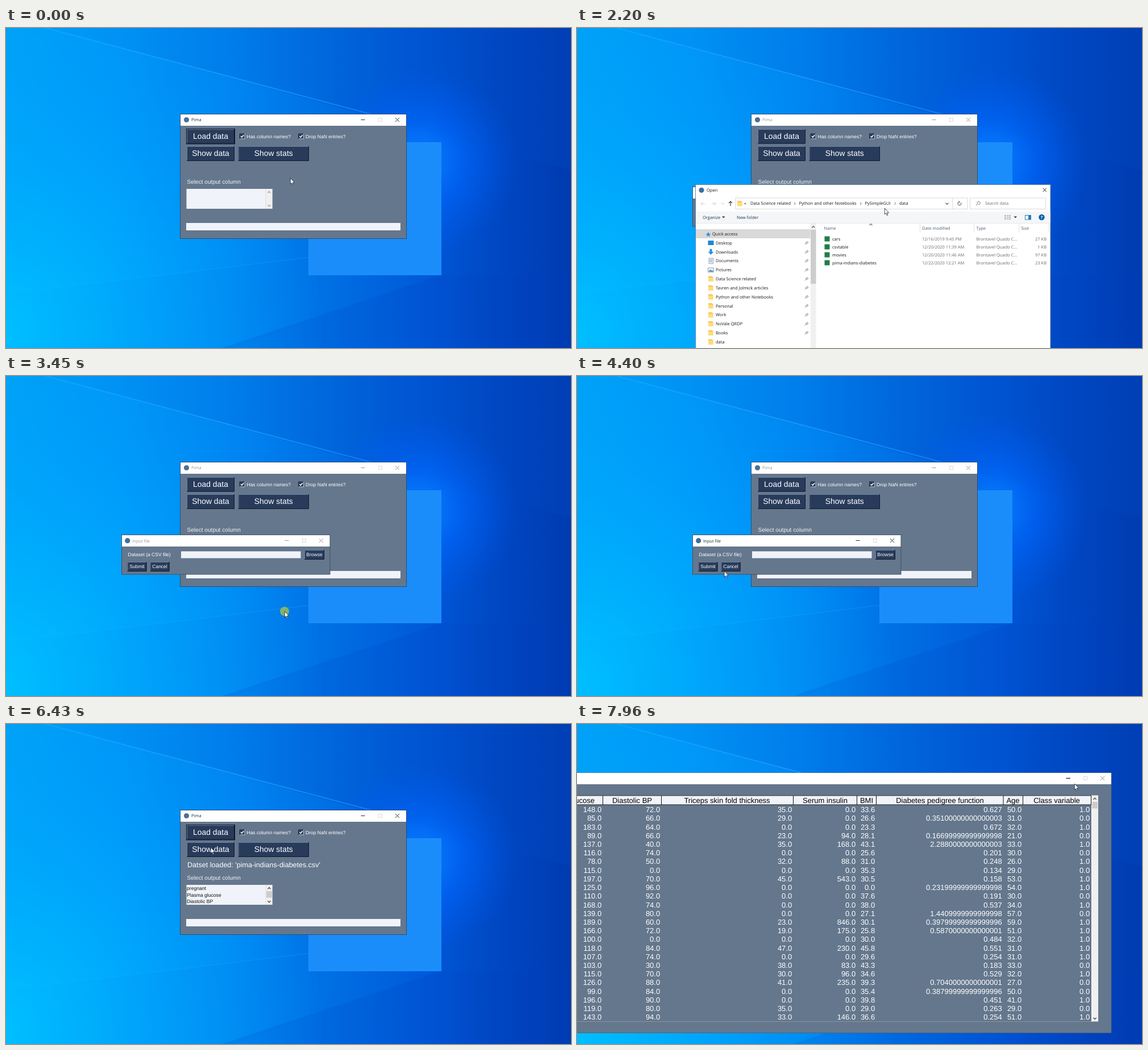
An HTML page for the animation above (8000 ms loop, 994x563 px).

```html
<!DOCTYPE html>
<html lang="en">
<head>
<meta charset="utf-8">
<title>Loading a dataset</title>
<style>
html, body { margin: 0; width: 100%; height: 100%; overflow: hidden; background: #0068dd; }
svg { display: block; width: 994px; height: 563px; }
text { font-family: "Liberation Sans", Arial, sans-serif; font-size: 8.5px; fill: #fff; white-space: pre; text-rendering: geometricPrecision; }
.ui text, text.ui { font-family: "Open Sans", "Noto Sans", sans-serif; font-size: 7.5px; fill: #1a1a1a; }
.ui .head { fill: #4c607a; }
.ui .soft { fill: #6d6d6d; }
.ui .bar { fill: #1e395b; }
.title text { fill: currentColor; }
.big { font-size: 13.9px; }
.list text { font-size: 8.6px; fill: #111; }
.mid { text-anchor: middle; }
.end { text-anchor: end; }
.line { fill: none; stroke: #777; stroke-width: 1; }
.grid text { font-size: 13px; }
.grid .name { fill: #000; }

/* One percent is 80 ms */
.title, .input, .open, .loaded, .away, .halo, .hover, .sheet, .grid, .blank, .min {
  animation: 8s step-end infinite;
}
.main.title { animation-name: main-title; }
.input { animation-name: input; }
.input .title { animation-name: input-title; }
.open { animation-name: open; }
.loaded { animation-name: loaded; }
.away { animation-name: away; }
.halo { animation-name: halo; }
.hover { animation-name: hover; }
.sheet { animation-name: sheet; }
.sheet .grid { animation-name: grid; }
.min { animation-name: min; }
.pointer { animation: pointer 8s infinite linear; }

@keyframes main-title { 0%, 59.75% { color: #12303f } 9.25%  { color: #999 } 100% { color: #12303f } }
@keyframes input-title { 0%, 43.625% { color: #12303f } 24.375% { color: #999 } 100% { color: #12303f } }
@keyframes input { 0%, 59.75%, 100% { visibility: hidden } 9.25% { visibility: visible } }
@keyframes away { 0%, 59.75%, 100% { visibility: visible } 9.25% { visibility: hidden } }
@keyframes open { 0%, 43%, 100% { visibility: hidden } 27.5% { visibility: visible } }
@keyframes loaded { 0% { visibility: hidden } 59.75%, 100% { visibility: visible } }
@keyframes sheet { 0% { visibility: hidden } 88.125%, 100% { visibility: visible } }
@keyframes grid { 0% { visibility: hidden } 89.75%, 100% { visibility: visible } }
@keyframes min { 0% { visibility: hidden } 99.1%, 100% { visibility: visible } }
@keyframes halo {
  0%, 9.75%, 23.5%, 41.9%, 43.625%, 60.5%, 88%, 100% { opacity: 0 }
  8.75%, 22.75%, 41.25%, 42.6%, 59.125%, 87.375% { opacity: 1 }
}
@keyframes hover {
  0% { opacity: 0; transform: none; fill: #e5f3ff }
  31.375% { opacity: 1; transform: none; fill: #e5f3ff }
  32.375% { opacity: 1; transform: translateY(14px); fill: #e5f3ff }
  33.625% { opacity: 1; transform: translateY(28px); fill: #e5f3ff }
  35.75% { opacity: 1; transform: translateY(42px); fill: #e5f3ff }
  41.25%, 100% { opacity: 1; transform: translateY(42px); fill: #cce8ff }
}
@keyframes pointer {
  0%, .4% { transform: translate(500px, 264px); animation-timing-function: ease-in-out }
  4.625% { transform: translate(377px, 188px) }
  13.6% { transform: translate(377px, 188px); animation-timing-function: ease-in }
  17.5% { transform: translate(501px, 306px); animation-timing-function: ease-out }
  20.875% { transform: translate(541px, 317px) }
  28.1% { transform: translate(541px, 317px); animation-timing-function: cubic-bezier(.4, 0, .7, .8) }
  35.125% { transform: translate(494px, 402px); animation-timing-function: ease-out }
  36.75% { transform: translate(490px, 414px) }
  47.4% { transform: translate(490px, 414px); animation-timing-function: ease-in-out }
  56.875% { transform: translate(239px, 337px) }
  66.3% { transform: translate(239px, 337px) }
  66.875% { transform: translate(257px, 331px) }
  73.1% { transform: translate(413px, 222px); animation-timing-function: ease-out }
  76.5% { transform: translate(392px, 217px) }
  77% { transform: translate(392px, 217px) }
  78.2% { transform: translate(378px, 211px); animation-timing-function: ease-out }
  80.375% { transform: translate(360px, 217px) }
  94.2% { transform: translate(360px, 217px); animation-timing-function: ease-in-out }
  99.5%, 100% { transform: translate(875px, 105px) }
}
</style>
</head>
<body>
<svg viewBox="0 0 994 563" xmlns="http://www.w3.org/2000/svg">
<defs>
  <linearGradient id="sky">
    <stop offset="0" stop-color="#00a2f7"/><stop offset=".2" stop-color="#0097f8"/>
    <stop offset=".4" stop-color="#0086f2"/><stop offset=".6" stop-color="#006be2"/>
    <stop offset=".76" stop-color="#0056d6"/><stop offset=".87" stop-color="#0047c3"/>
    <stop offset="1" stop-color="#003bb0"/>
  </linearGradient>
  <radialGradient id="corner" gradientUnits="userSpaceOnUse" cx="0" cy="540" r="560">
    <stop offset="0" stop-color="#00c2ff"/><stop offset=".4" stop-color="#00b2ff" stop-opacity=".65"/>
    <stop offset="1" stop-color="#00a0ff" stop-opacity="0"/>
  </radialGradient>
  <radialGradient id="glow" gradientUnits="userSpaceOnUse" cx="730" cy="235" r="170">
    <stop offset="0" stop-color="#0a84ff"/><stop offset=".45" stop-color="#0068ff" stop-opacity=".6"/>
    <stop offset="1" stop-color="#005af0" stop-opacity="0"/>
  </radialGradient>
  <linearGradient id="ray" gradientUnits="userSpaceOnUse" x1="70" y1="0" x2="700" y2="0">
    <stop offset="0" stop-color="#2cb4ff" stop-opacity=".35"/><stop offset=".5" stop-color="#18a0ff" stop-opacity=".85"/>
    <stop offset="1" stop-color="#1a90ff" stop-opacity=".5"/>
  </linearGradient>
  <linearGradient id="shade" gradientUnits="userSpaceOnUse" x1="60" y1="0" x2="700" y2="0">
    <stop offset="0" stop-color="#0050c8" stop-opacity=".02"/><stop offset="1" stop-color="#0048c0" stop-opacity=".28"/>
  </linearGradient>
  <linearGradient id="low" gradientUnits="userSpaceOnUse" x1="0" y1="0" x2="780" y2="0">
    <stop offset="0" stop-color="#00b0ff" stop-opacity=".15"/><stop offset="1" stop-color="#0058d8" stop-opacity=".3"/>
  </linearGradient>
  <g id="caption">
    <path d="M-79.5 9.5h7M-19 6l7 7m0-7l-7 7" fill="none" stroke="currentColor"/>
    <rect x="-48.5" y="6.5" width="6" height="6" fill="none" stroke="#d4d4d4" stroke-width=".8"/>
  </g>
  <path id="up" d="M-2.5 1.3L0-1.3 2.5 1.3" fill="none" stroke-width="1.2"/>
  <path id="down" d="M-2.5-1.3L0 1.3 2.5-1.3" fill="none" stroke-width="1.2"/>
  <path id="tick" d="M-1.5-2.2L.8 0-1.5 2.2" fill="none" stroke="#555" stroke-width=".9"/>
  <path id="pin" d="M-3 3l2.3-2.3M-2-1L1 2M-.8-.4L1-2.6 2.8-.8.6 1" fill="none" stroke="#777" stroke-width="1"/>
  <g id="folder"><path d="M-4.5-4.5h6.5l2 1.5v7.5h-8.5z" fill="#f3c64f"/><path d="M-4.5-2.2h8.5v6.7h-8.5z" fill="#ffdc7c"/></g>
  <g id="check"><rect x="-4.5" y="-4.5" width="9" height="9" fill="#283b5b"/><path d="M-4.5 4.5v-9h9" fill="none" stroke="#24334b"/><path d="M-4 4.5h8.5v-9" fill="none" stroke="#bcc6d2"/><path d="M-2.5-.3L-.7 1.8 2.7-2.2" fill="none" stroke="#fff" stroke-width="1.5"/></g>
</defs>

<rect width="994" height="563" fill="url(#sky)"/>
<rect width="994" height="563" fill="url(#corner)"/>
<path d="M70 0L704 172 994 250V0z" fill="url(#shade)"/>
<path d="M0 468L537 403 765 435 400 563H0z" fill="url(#low)"/>
<path d="M765 435L380 563H994V435z" fill="#0040b8" opacity=".15"/>
<rect x="520" y="40" width="400" height="400" fill="url(#glow)"/>
<path d="M70 0L640 151 704 172" fill="none" stroke="url(#ray)" stroke-width="2"/>
<path d="M0 468L537 403" stroke="#1cb4ff" stroke-opacity=".35"/>
<rect x="532" y="201" width="234" height="234" fill="#1b8dfb"/>

<g id="main">
  <rect x="307" y="152" width="397" height="218.5" fill="#64778d"/>
  <rect x="307" y="152" width="397" height="20" fill="#fff"/>
  <rect x="306.5" y="151.5" width="398" height="219" fill="none" stroke="#2b4a68" stroke-width=".9"/>
  <g class="main title ui">
    <circle cx="317.5" cy="161.5" r="4.6" fill="#4a7196"/>
    <text x="326" y="164.4">Pima</text>
    <use href="#caption" x="704" y="152"/>
  </g>
  <g id="mainButtons"></g>
  <rect class="away" x="317.5" y="177.5" width="85" height="26.5" fill="none" stroke="#0c121c"/>
  <use href="#check" x="415.5" y="190.5"/><text x="423.5" y="193.6">Has column names?</text>
  <use href="#check" x="519" y="190.5"/><text x="527" y="193.6">Drop NaN entries?</text>
  <text x="318.5" y="274.2" style="font-size:10.1px;fill:#f0f2f5">Select output column</text>
  <rect x="317.5" y="283" width="151" height="35" fill="#f0f3f9"/>
  <rect x="457" y="283" width="11.5" height="35" fill="#f0f0f0"/>
  <path d="M457 283v35" stroke="#d8d8d8" stroke-width=".8"/>
  <g stroke="#9a9a9a"><use href="#up" x="463" y="289"/><use href="#down" x="463" y="312.5"/></g>
  <g class="loaded list">
    <text x="319" y="252.2" style="font-size:12.54px;fill:#fff">Datset loaded: 'pima-indians-diabetes.csv'</text>
    <text x="318" y="292.3">pregnant</text>
    <text x="318" y="303.5">Plasma glucose</text>
    <text x="318" y="314.6">Diastolic BP</text>
    <rect x="458" y="294" width="10" height="11.5" fill="#cdcdcd"/>
    <g stroke="#444"><use href="#up" x="463" y="289"/><use href="#down" x="463" y="312.5"/></g>
  </g>
  <rect x="317" y="343" width="377" height="13" fill="#f0f3f9"/>
</g>

<g class="input">
  <rect x="203.5" y="280" width="366.5" height="69" fill="#64778d"/>
  <rect x="203.5" y="280" width="366.5" height="20" fill="#fff"/>
  <rect x="203.5" y="279.5" width="366.5" height="69.5" fill="none" stroke="#3c4e62" stroke-width=".9"/>
  <g class="title ui">
    <circle cx="213.7" cy="289.7" r="4.6" fill="#3c6f9f"/>
    <text x="222" y="292.6">Input file</text>
    <use href="#caption" x="570" y="280"/>
  </g>
  <text x="214.5" y="317.2">Dataset (a CSV file)</text>
  <rect x="307.5" y="308" width="211" height="12.5" fill="#f0f3f9"/>
  <path d="M307.5 320.5v-12.5h211" fill="none" stroke="#4c5b6d" stroke-width=".7"/>
  <g id="inputButtons"></g>
</g>

<g class="open ui">
  <rect x="208.5" y="275.5" width="624.5" height="300" fill="#fff" stroke="#3b6f9c" stroke-width=".8"/>
  <circle cx="219" cy="285.3" r="4.6" fill="#3c6f9f"/>
  <text x="228" y="288.2">Open</text>
  <path d="M819.5 281.7l6.5 6.5m0-6.5l-6.5 6.5" class="line" style="stroke:#222"/>
  <path d="M225 309h-7m3-3l-3 3 3 3M237 309h7m-3-3l3 3-3 3" class="line" style="stroke:#ccc"/>
  <use href="#down" x="256.5" y="309" stroke="#bbb" transform="translate(51.3 61.8) scale(.8)"/>
  <path d="M270 313v-8m-3 3l3-3 3 3" class="line" style="stroke:#444;stroke-width:1.2"/>
  <rect x="279" y="299" width="408" height="19.5" class="line" style="stroke:#d9d9d9"/>
  <path d="M661 299v19.5" class="line" style="stroke:#d9d9d9"/>
  <use href="#folder" x="286.5" y="308.7"/>
  <text x="294" y="311.4">«</text>
  <text x="305" y="311.4">Data Science related</text><use href="#tick" x="383.5" y="308.8"/>
  <text x="390.5" y="311.4">Python and other Notebooks</text><use href="#tick" x="499.5" y="308.8"/>
  <text x="506.5" y="311.4">PySimpleGUI</text><use href="#tick" x="560" y="308.8"/>
  <text x="567" y="311.4">data</text>
  <use href="#down" x="651" y="309" stroke="#555"/>
  <path d="M675.3 307.2a3 3 0 1 1-2.6-1.3m-1.2-1.6l1.8 1.6-1.6 1.8" class="line" style="stroke:#444"/>
  <rect x="691.5" y="299" width="133" height="19.5" class="line" style="stroke:#d9d9d9"/>
  <path d="M702 312l2.5-2.6a2.6 2.6 0 1 1 1.2 1" class="line"/>
  <text class="soft" x="718" y="311.4">Search data</text>
  <rect x="209" y="323" width="623.5" height="20" fill="#f5f6f7"/>
  <path d="M209 343.5h623.5" class="line" style="stroke:#e6e8ea"/>
  <text class="bar" x="221" y="335.9">Organize</text><path d="M255 331.5h5.6l-2.8 3z" fill="#1e395b"/>
  <text class="bar" x="281" y="335.9">New folder</text>
  <path d="M752 330h3m1.500 0h2.500m1 0h3M752 333h3m1.500 0h2.500m1 0h3M752 336h3m1.500 0h2.500m1 0h3" class="line"/>
  <path d="M768.500 331.500h5.600l-2.800 3z" fill="#333"/>
  <rect x="788.500" y="329.500" width="10" height="7.500" fill="#fff" stroke="#2a7ab8"/><path d="M794 329.500h4.500v7.500H794z" fill="#2a7ab8"/>
  <circle cx="817.500" cy="333" r="5.200" fill="#0a5fb0"/><text class="mid" x="817.500" y="335.900" style="fill:#fff;font-weight:700">?</text>
  <rect x="209" y="354" width="201.500" height="16" fill="#d9d9d9"/>
  <path d="M226.500 362h3l1.500-3.200 1.500 3.200h3l-2.500 2 1 3.200-3-2-3 2 1-3.200z" fill="#2f8fdc"/>
  <text x="238" y="364.900">Quick access</text>
  <g id="places"></g>
  <rect x="411" y="344" width="9.500" height="219" fill="#f0f0f0"/>
  <rect x="411" y="355" width="9.500" height="95" fill="#cdcdcd"/>
  <use href="#up" x="415.700" y="350" stroke="#555"/>
  <path d="M603.500 344v16M698.500 344v16M777.500 344v16M830.500 344v16" class="line" style="stroke:#e2e2e2"/>
  <use href="#up" x="517" y="346" stroke="#666"/>
  <text class="head" x="434.500" y="354.900">Name</text><text class="head" x="607" y="354.900">Date modified</text>
  <text class="head" x="702.500" y="354.900">Type</text><text class="head" x="781.500" y="354.900">Size</text>
  <rect class="hover" x="432" y="364" width="396" height="14"/>
  <g id="files"></g>
</g>

<g class="sheet">
  <rect x="-2" y="86" width="942" height="457.500" fill="#64778d" stroke="#4a5f78" stroke-width=".8"/>
  <rect x="0" y="86" width="939.800" height="20" fill="#fff"/>
  <g color="#8c8c8c"><use href="#caption" x="940" y="86"/></g>
  <path class="min" d="M860.500 95.500h7.500" stroke="#111" stroke-width="1.200"/>
  <rect x="0" y="125.500" width="905.500" height="398" fill="#f0f0f0"/>
  <rect x="905.500" y="125.500" width="11.500" height="398" fill="#f0f0f0"/>
  <path d="M905.500 125.500v398" stroke="#fff"/>
  <rect x="906" y="137" width="10" height="11.500" fill="#cdcdcd"/>
  <g stroke="#333"><use href="#up" x="911" y="131.500"/><use href="#down" x="911" y="518"/></g>
  <g class="grid">
    <rect x="0" y="125.500" width="905" height="398" fill="#64778d"/>
    <rect x="-1" y="126" width="905.500" height="16" fill="#f0f3f9" stroke="#111" stroke-width=".9"/>
    <g id="columns"></g>
  </g>
</g>

<g class="pointer">
  <circle class="halo" r="8" fill="#d8d414" fill-opacity=".6"/>
  <path d="M.3 0V10.800L2.700 8.600 4.300 12.700 5.900 12 4.300 8H7.600z" fill="#fff" stroke="#15203a" stroke-width=".8"/>
</g>
</svg>
<script>
const fill = (id, parts) => { document.getElementById(id).innerHTML = parts.join(''); };
const label = (x, y, s, cls = '') => `<text x="${x}" y="${y}" class="${cls}">${s}</text>`;

const button = (x, y, w, h, s, cls, drop) =>
  `<rect x="${x}" y="${y}" width="${w}" height="${h}" fill="#283b5b"/>
   <path d="M${x + .5} ${y + h}V${y + .5}H${x + w}" fill="none" stroke="#7288a6" stroke-width=".9"/>
   <path d="M${x} ${y + h - .5}H${x + w - .5}V${y}" fill="none" stroke="#111a29"/>` +
  label(x + w / 2, y + h / 2 + drop, s, 'mid ' + cls);

fill('mainButtons', [
  button(318, 178, 84, 25.5, 'Load data', 'big', 4.4),
  button(318, 208, 84, 26, 'Show data', 'big', 4.4),
  button(408.5, 208, 124.5, 26, 'Show stats', 'big', 4.4)
]);
fill('inputButtons', [
  button(525, 306, 35, 17, 'Browse', '', 2.8),
  button(213.5, 327, 34, 17, 'Submit', '', 2.8),
  button(253.5, 327, 34, 17, 'Cancel', '', 2.8)
]);

const icons = {
  Desktop: '<rect x="-5" y="-4" width="10" height="7.5" fill="#1e88d8"/><path d="M-5 3h10" stroke="#0b5a9a"/>',
  Downloads: '<path d="M-2-5h4v5h3L0 5-5 0h3z" fill="#2b8fdc"/>',
  Documents: '<path d="M-3.500-4.500h7.500v9.500h-7.500z" fill="#f4f7fa" stroke="#7d8c9a" stroke-width=".8"/><path d="M-2-2h4.500M-2 0h4.500M-2 2h4.500" stroke="#5a8fc0" stroke-width=".8"/>',
  Pictures: '<path d="M-5-3.500h10v7.500h-10z" fill="#e8f2fa" stroke="#7d8c9a" stroke-width=".8"/><path d="M-4 3l3-3.500 2 2 1.500-1 2 2.500z" fill="#3a7fb4"/>'
};
const places = ['Desktop', 'Downloads', 'Documents', 'Pictures', 'Data Science related',
  'Tavren and Jolmick articles', 'Python and other Notebooks', 'Personal', 'Work',
  'NoVale QRDP', 'Books', 'data'];
fill('places', places.map((s, i) => {
  const y = 378 + 15.83 * i;
  const pin = s === 'data' ? '' : `<use href="#pin" x="404" y="${y}"/>`;
  return `<g transform="translate(235.500 ${y})">${icons[s] || '<use href="#folder"/>'}</g>` +
    label(244, y + 2.8, s) + pin;
}));

const files = [
  ['cars', '12/16/2019 9:45 PM', '27 KB'],
  ['csvtable', '12/20/2020 11:39 AM', '1 KB'],
  ['movies', '12/20/2020 11:46 AM', '97 KB'],
  ['pima-indians-diabetes', '12/22/2020 12:21 AM', '23 KB']
];
fill('files', files.map(([name, date, size], i) => {
  const y = 373.8 + 14 * i;
  return `<rect x="435.500" y="${y - 7.3}" width="9" height="9" fill="#1e7e48"/>` +
    label(449, y, name) + label(607, y, date, 'soft') +
    label(702.500, y, 'Brontavel Quado C...', 'soft') + label(826, y, size, 'soft end');
}));

// edge: right border of the column; mid: centre of its heading
const column = (edge, mid, name, values) =>
  `<path d="M${edge + .5} 126v16" stroke="#111"/>` + label(mid, 139.4, name, 'name mid') +
  values.map((v, i) => label(edge - 1.8, 155.2 + 15.21 * i, v, 'end')).join('');
const whole = s => s.split(' ').map(v => v + '.0');

fill('columns', [
  column(45, -15, 'Plasma glucose', whole('148 85 183 89 137 116 78 115 197 125 110 168 139 189 166 100 118 107 103 115 126 99 196 119 143')),
  column(148, 97, 'Diastolic BP', whole('72 66 64 66 40 74 50 0 70 96 92 74 80 60 72 0 84 74 30 70 88 84 90 80 94')),
  column(380, 264, 'Triceps skin fold thickness', whole('35 29 0 23 35 0 32 0 45 0 0 0 0 23 19 0 47 0 38 30 41 0 0 35 33')),
  column(492, 436.5, 'Serum insulin', whole('0 0 0 94 168 0 88 0 543 0 0 0 0 846 175 0 230 0 83 96 235 0 0 0 146')),
  column(526, 509.5, 'BMI', '33.6 26.6 23.3 28.1 43.1 25.6 31.0 35.3 30.5 0.0 37.6 38.0 27.1 30.1 25.8 30.0 45.8 29.6 43.3 34.6 39.3 35.4 39.8 29.0 36.6'.split(' ')),
  column(749.5, 638.5, 'Diabetes pedigree function', ('0.627 0.35100000000000003 0.672 0.16699999999999998 2.2880000000000003 0.201 0.248 0.134 0.158 ' +
    '0.23199999999999998 0.191 0.537 1.4409999999999998 0.39799999999999996 0.5870000000000001 0.484 0.551 0.254 0.183 0.529 ' +
    '0.7040000000000001 0.38799999999999996 0.451 0.263 0.254').split(' ')),
  column(784, 767, 'Age', whole('50 31 32 21 33 30 26 29 53 54 30 34 57 59 51 32 31 31 33 32 27 50 41 29 51')),
  column(904, 844, 'Class variable', [...'1010101011010111110100101'].map(v => v + '.0'))
]);
</script>
</body>
</html>
```
